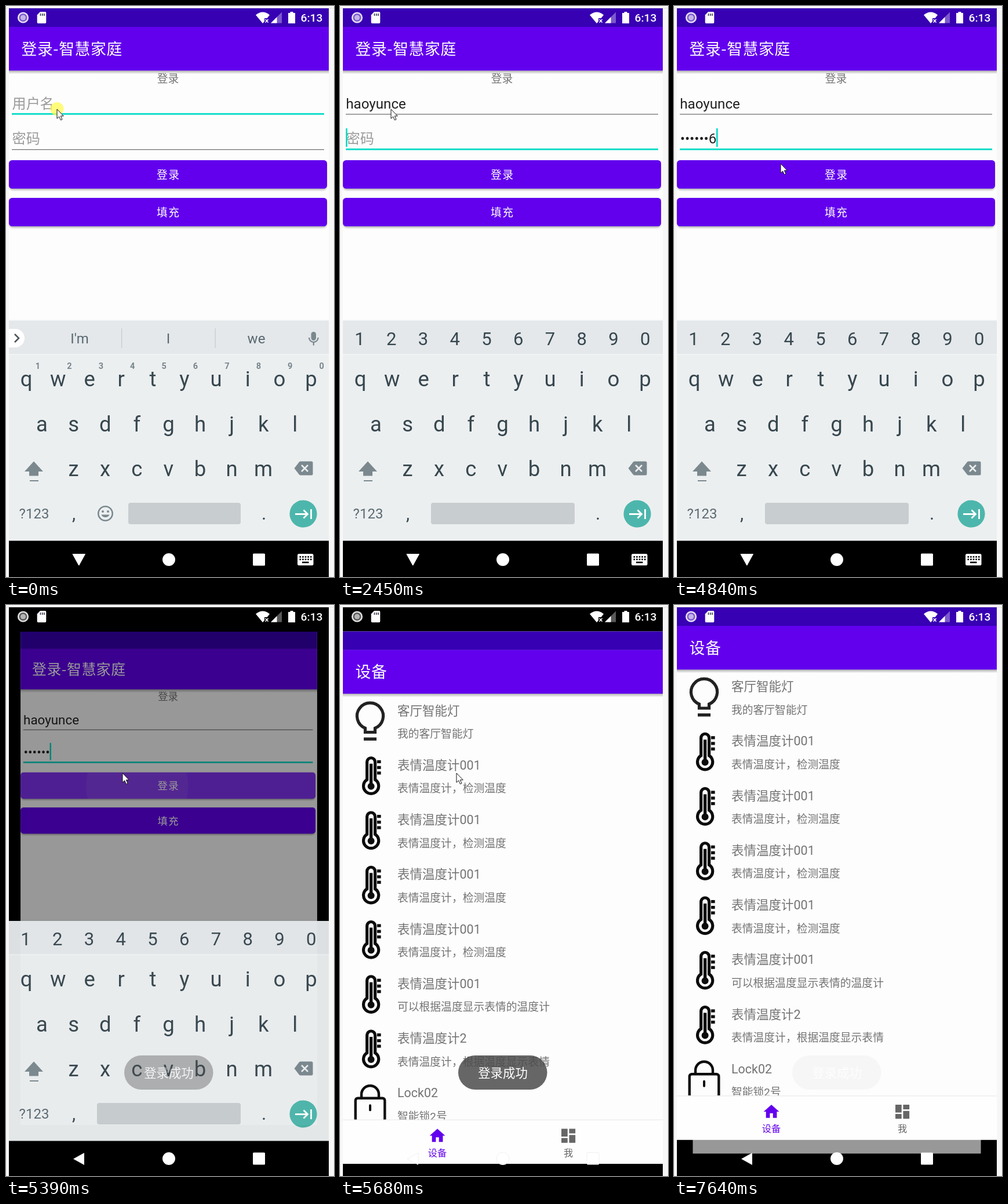
Animation of 566 by 985 pixels, one loop 8.42 s. Source, as an HTML page:

```html
<!DOCTYPE html>
<html lang="zh-CN">
<head>
<meta charset="utf-8">
<title>登录</title>
<style>
  html, body { margin: 0; width: 100%; height: 100%; overflow: hidden; background: #f7f7f7; }
  svg { display: block; width: 100%; height: 100%; }
  text { font-family: Roboto, "Noto Sans CJK SC", "Noto Sans CJK", sans-serif; white-space: pre; }
  .title { font-family: "Noto Sans CJK SC", "Noto Sans CJK", sans-serif; }
</style>
</head>
<body>
<svg id="stage" viewBox="0 0 566 985" xmlns="http://www.w3.org/2000/svg"></svg>
<script>
const LOOP = 8420;
const TEAL = '#03dac5', PURPLE = '#6200ee', KEY = '#37474f', GREY = '#7b898f';
const USER = 'haoyunce', PASS = '1234566';

// ---- markup helpers ----
const rect = (x, y, w, h, fill, more = '') =>
  `<rect x="${x}" y="${y}" width="${w}" height="${h}" fill="${fill}" ${more}/>`;
const text = (x, y, size, fill, str, more = '') =>
  `<text x="${x}" y="${y}" font-size="${size}" fill="${fill}" ${more}>${str}</text>`;
const mid = (x, y, size, fill, str, more = '') =>
  text(x, y, size, fill, str, 'text-anchor="middle" ' + more);
const path = (d, fill, more = '') => `<path d="${d}" fill="${fill}" ${more}/>`;
const line = (d, color, width, more = '') =>
  path(d, 'none', `stroke="${color}" stroke-width="${width}" ${more}`);
const circle = (x, y, r, fill, more = '') =>
  `<circle cx="${x}" cy="${y}" r="${r}" fill="${fill}" ${more}/>`;
const group = (id, body, more = '') => `<g id="${id}" ${more}>${body}</g>`;

function header(title) {
  return rect(5, 4, 552, 32.3, '#3700b3') + rect(5, 36, 552, 75.5, PURPLE) +
    rect(5, 111.5, 552, 6, 'url(#shade)') +
    text(26.5, 83.5, 26.8, '#fff', title, 'class="title" letter-spacing=".6"');
}

function button(y, label, extra = '') {
  return rect(5.5, y + 2, 548, 49.5, '#000', 'rx="6" opacity=".28" filter="url(#soft)"') +
    rect(5, y, 549, 49, PURPLE, 'rx="5.5"') + extra +
    mid(280.3, y + 31.7, 18.8, '#fff', label, 'letter-spacing="1.6"');
}

function loginPage() {
  const press = group('press', rect(5, 266, 549, 49, '#fff', 'rx="5.5" opacity=".2"') +
    circle(222, 291, 95, '#fff', 'id="ripple" opacity=".07" clip-path="url(#btn)"'));
  return rect(5, 4, 552, 918, '#fdfdfd') + header('登录-智慧家庭') +
    mid(279.5, 131.5, 18.8, '#757575', '登录') +
    text(10.5, 176.5, 24.15, '#9b9b9b', '用户名', 'id="userHint"') +
    text(10.3, 176.5, 24.15, '#212121', '', 'id="user"') +
    rect(10, 186, 539, 1.3, '#757575', 'id="userLine"') +
    text(10.5, 236.5, 24.15, '#9b9b9b', '密码', 'id="passHint"') +
    text(10.8, 236.5, 24.15, '#212121', '', 'id="pass"') +
    rect(10, 247, 539, 1.3, '#757575', 'id="passLine"') +
    rect(10, 151, 2.6, 32, TEAL, 'id="caret"') +
    button(266, '登录', press) + button(331, '填充') +
    rect(5, 4, 552, 918, '#000', 'id="dim" opacity="0"');
}

function keyboard() {
  const row = (letters, x, y) => [...letters].map((c, i) =>
    mid(x + 54.6 * i, y, 36.5, KEY, c)).join('');
  const digits = [...'1234567890'];
  const words = rect(199, 556, 1.2, 34, '#c3c9cc') + rect(360.5, 556, 1.2, 34, '#c3c9cc') +
    [127, 280, 432].map((x, i) => mid(x, 582, 24, '#59686f', '', `id="word${i}"`)).join('') +
    path('M5 557H16A16 16 0 0 1 16 589H5Z', '#fff') +
    line('M15 566L22 573L15 580', '#4d565a', 2.6) +
    rect(526.5, 562, 8.5, 15, GREY, 'rx="4.2"') +
    line('M523 572a7.8 7.8 0 0 0 15.6 0M530.8 580v5.5', GREY, 2.3) +
    digits.map((d, i) => mid(55 + 54.4 * i, 626, 14.5, '#78858b', d, 'font-weight="700"')).join('') +
    circle(171.5, 875.5, 12.2, 'none', `stroke="${GREY}" stroke-width="2.6"`) +
    circle(167, 872, 2, GREY) + circle(176, 872, 2, GREY) +
    path('M164.5 877.5h14a7.4 6.6 0 0 1-14 0Z', GREY);
  const numbers = digits.map((d, i) => mid(34 + 54.75 * i, 585, 31, KEY, d)).join('');
  return rect(5, 541.5, 552, 2, '#000', 'opacity=".04"') +
    rect(5, 543, 552, 58, '#e4e8eb') + rect(5, 601, 552, 321.5, '#eceff0') +
    rect(5, 600.5, 552, 1.5, '#f5f7f8') +
    group('words', words) + group('numbers', numbers) +
    row('qwertyuiop', 35, 656) + row('asdfghjkl', 62, 734) + row('zxcvbnm', 116.5, 811) +
    path('M48 785.5L64 803H56V810.5H40V803H32Z', GREY) + rect(41, 818, 15, 2, GREY) +
    path('M497.5 797.5L506 786.5Q507 785.5 508.5 785.5H527Q529.5 785.5 529.5 788V807Q529.5 809.5 527 809.5H508.5Q507 809.5 506 808.5Z', GREY) +
    line('M510 792l11 11M521 792l-11 11', '#eceff0', 2.6) +
    mid(48.5, 884, 24, '#5c6b72', '?123') +
    mid(117, 886, 31, KEY, ',') + mid(445, 886, 31, KEY, '.') +
    rect(211, 857, 194, 37, '#c8cdcf', 'id="space" rx="4"') +
    circle(513, 876, 23.6, '#4db6ac') +
    line('M499 876.5h21M513.5 869.5l7 7-7 7M526.5 868v17', '#fff', 2.8);
}

const bulb = y => `<g transform="translate(0 ${y})">` +
  line('M43.5 53V46A22.6 22.6 0 1 1 60.5 46V53Z', '#222', 5.2) +
  rect(41, 62, 22, 5.4, '#222') + '</g>';
const thermometer = y => `<g transform="translate(0 ${y})">` +
  line('M46.6 10a7 7 0 0 1 14 0V40.5A13.1 13.1 0 1 1 46.6 40.5Z', '#0c0c0c', 5.2) +
  line('M53.6 13V50', '#0c0c0c', 5.4) + circle(53.6, 52, 6, '#0c0c0c') +
  [7, 17, 26.5].map(t => rect(64, t, 6.6, 5.2, '#0c0c0c')).join('') + '</g>';
const lock = y => `<g transform="translate(0 ${y})">` +
  line('M37 25V18a15 15 0 0 1 30 0V25', '#0c0c0c', 4.4) +
  rect(26.7, 24.5, 50.6, 40, 'none', 'rx="4" stroke="#0c0c0c" stroke-width="4.4"') +
  line('M52 37V45', '#0c0c0c', 4, 'stroke-linecap="round"') + '</g>';

function devicePage() {
  const meter = '表情温度计';
  const rows = [['客厅智能灯', '我的客厅智能灯', bulb]];
  for (let i = 0; i < 4; i++) rows.push([meter + '001', meter + '，检测温度', thermometer]);
  rows.push([meter + '001', '可以根据温度显示表情的温度计', thermometer],
    [meter + '2', meter + '，根据温度显示表情', thermometer],
    ['Lock02', '智能锁2号', lock]);
  const list = rows.map(([name, note, icon], i) => {
    const y = 94.25 * i;
    return icon(y + 125) + text(99, y + 148, 21.5, '#737373', name) +
      text(99, y + 187.5, 18.8, '#737373', note);
  }).join('');
  const tab = (x, d, label, color) =>
    path(d, color, `transform="translate(${x - 16} 858) scale(1.34)"`) +
    mid(x, 909, 16.2, color, label);
  return rect(5, 4, 552, 918.5, '#fdfdfd') + header('设备') + list +
    rect(5, 847, 552, 75.5, '#fefefe') + rect(5, 846, 552, 1.5, '#eee') +
    tab(168, 'M10 20v-6h4v6h5v-8h3L12 3 2 12h3v8z', '设备', PURPLE) +
    tab(394, 'M3 13h8V3H3zM3 21h8v-6H3zM13 21h8V11h-8zM13 3v6h8V3z', '我', '#666');
}

function statusIcons() {
  return circle(29.5, 20, 8.3, '#fff', 'fill-opacity=".35" stroke="#fff" stroke-opacity=".85" stroke-width="2.6"') +
    circle(29.5, 20, 4.6, '#fff', 'opacity=".55"') +
    path('M59 10H67.5Q69.3 10 69.3 12V28Q69.3 30 67.5 30H55.5Q53.7 30 53.7 28V15.5Z', '#fff') +
    line('M59.5 13v4M62.8 13v4M66 13v4', '#3a3a50', 1.6) +
    path('M431 15.5Q443 5.5 455 15.5L450.5 21H446V26.5L443 30Z', '#fff') +
    line('M447.5 23l5 5.5M452.5 23l-5 5.5', '#fff', 1.6) +
    path('M457 29.5L476 10.5V29.5Z', '#fff', 'opacity=".35"') +
    path('M457 29.5L467.5 19V29.5Z', '#fff') +
    path('M490.5 10H495.500V12H499V30H487V12H490.5Z', '#fff') +
    text(508.5, 27.3, 19.2, '#fff', '6:13', 'font-weight="500"');
}

function navIcons() {
  const edge = 'stroke="#000" stroke-opacity=".06" stroke-width="1"';
  const keys = [0, 1].map(r => [0, 1, 2, 3, 4].map(c =>
    rect(506.5 + c * 4.6, 949 + r * 4.4, 2.6, 2.6, '#000')).join('')).join('');
  return path('M115 945.5H136.500L125.8 965Z', '#fff', `id="down" stroke="#fff" stroke-linejoin="round"`) +
    path('M135 945V966L116 955.500Z', '#fff', `id="back" stroke-linejoin="round" ${edge}`) +
    circle(281, 955, 11, '#fff', edge) + rect(426, 944.5, 21, 21, '#fff', 'rx="1.5" ' + edge) +
    group('ime', rect(503, 945, 27.5, 20, '#fff', 'rx="2.500"') + keys +
      rect(511, 958.5, 11.5, 2.6, '#000'));
}

const stage = document.getElementById('stage');
stage.innerHTML = `<defs>
  <linearGradient id="shade" x1="0" y1="0" x2="0" y2="1">
    <stop offset="0" stop-color="#000" stop-opacity=".3"/><stop offset="1" stop-color="#000" stop-opacity="0"/>
  </linearGradient>
  <filter id="soft" x="-5%" y="-30%" width="110%" height="160%"><feGaussianBlur stdDeviation="1.4"/></filter>
  <clipPath id="btn">${rect(5, 266, 549, 49, '#000', 'rx="5.5"')}</clipPath>
  </defs>` +
  rect(0, 0, 566, 985, '#f7f7f7') + rect(5, 4, 552, 981, '#000') +
  group('login', loginPage()) + group('board', keyboard()) + group('page', devicePage()) +
  statusIcons() + navIcons() +
  group('toast', rect(204, 777, 153.5, 59, '#4c4c4c', 'rx="29.500" opacity=".85"') +
    mid(281, 814.5, 21.4, '#fff', '登录成功')) +
  circle(88, 177.5, 11.5, '#fff94f', 'id="tap"') +
  path('M0 0V16.2L3.7 12.8L6.4 18.8L9 17.700L6.400 11.800H11.300Z', '#fff',
    'id="mouse" stroke="#111" stroke-width="1"') +
  rect(0, 0, 566, 3, '#fbfbfb') + rect(0, 3, 566, 1, '#e0e0e0');

const el = {};
stage.querySelectorAll('[id]').forEach(n => el[n.id] = n);
const set = (id, attrs) => { for (const k in attrs) el[id].setAttribute(k, attrs[k]); };
const show = (id, on) => set(id, { visibility: on ? 'visible' : 'hidden' });
const write = (id, str) => { if (el[id].textContent !== str) el[id].textContent = str; };

// ---- timing ----
const spread = (a, b, n) =>
  Array.from({ length: n }, (_, i) => Math.floor((a + (b - a) * i / (n - 1)) / 10) * 10);
const ticks = [0, 80, 150, ...spread(4380, 5160, 11), ...spread(5240, 5830, 9),
  ...spread(6000, 6780, 11), 6860, ...spread(7410, 7640, 4)];
const lastOf = (list, t) => list.filter(x => x <= t).pop();

// keys: [time, value, value, ...]
function track(keys, t) {
  const i = keys.findIndex(k => k[0] > t);
  if (i < 0) return keys[keys.length - 1].slice(1);
  if (i === 0) return keys[0].slice(1);
  const [a, b] = [keys[i - 1], keys[i]], p = (t - a[0]) / (b[0] - a[0]);
  return a.slice(1).map((v, j) => v + (b[j + 1] - v) * p);
}

const MOUSE = [[4380, 88, 178], [4840, 184, 272], [5160, 186, 283], [5310, 201, 290],
  [5920, 201, 290], [6780, 354, 937], [6860, 360, 946], [7400, 360, 946], [7410, 360, 966], [7480, 360, 990]];
const LOGIN = [[5240, 1, 4, 0], [5310, .97, 20, .2], [5380, .927, 46, .4], [5460, .912, 70, .4],
  [5530, .902, 96, .4], [5830, .9, 120, .4]];
const PAGE = [[5460, 800, .35], [5530, 571, .765], [5600, 200, .95], [5680, 41.5, 1], [5750, 12, 1], [5830, 0, 1]];
const BOARD = [[5310, 0, 1], [5380, 2, .97], [5460, 60, .4], [5530, 140, 0]];
const TOAST = [[5310, 0], [5380, .45], [5530, .81], [5680, 1], [7400, 1], [7410, .8], [7640, .04]];
const TYPED = [[0, 0], [1030, 1], [1190, 2], [1270, 3], [1440, 5], [1690, 6], [1820, 7], [1990, 8]];
const SECRET = [3080, 3310, 3540, 3850, 4150, 4380, 4610];
const WORDS = [["I'm", 'I', 'we'], ['h', 'he', 'have'], ['ha', 'have', 'happy'], ['hao', 'has', 'harbor'],
  [], ['haoyu', 'hairy', 'hallway'], ['haoyun', 'haven', 'haunted'],
  ['haoyunc', 'haunch', 'launched'], ['haoyunce', 'haunches', 'launches']];

function fields(t) {
  const n = TYPED.filter(k => k[0] <= t).pop()[1];
  const m = SECRET.filter(x => x <= t).length;
  const second = t >= 2370, numeric = t >= 2450;
  write('user', USER.slice(0, n));
  show('userHint', n === 0);
  const secret = t >= 5080 ? '•'.repeat(6) : m ? '•'.repeat(m - 1) + PASS[m - 1] : '';
  write('pass', secret);
  show('passHint', !secret);
  const mark = (id, on, y) => set(id, { y: on ? y - 1.2 : y, height: on ? 2.8 : 1.3, fill: on ? TEAL : '#757575' });
  mark('userLine', !second, 186);
  mark('passLine', second, 247);
  const field = el[second ? 'pass' : 'user'];
  const width = field.textContent ? field.getComputedTextLength() + .5 : 0;
  set('caret', { x: 10 + width, y: second ? 211 : 151 });
  show('caret', t >= 550 && !(t >= 2930 && t < 3080));
  WORDS[n].forEach((w, i) => write('word' + i, w));
  show('words', !numeric);
  show('numbers', numeric);
  set('space', numeric ? { x: 157, width: 248 } : { x: 211, width: 194 });
}

function draw(time) {
  const t = time % LOOP, s = lastOf(ticks, t);
  fields(t);

  const [scale, top, dim] = track(LOGIN, s);
  set('login', { transform: `translate(${281 * (1 - scale)} ${top - 4 * scale}) scale(${scale})` });
  set('dim', { opacity: dim });
  show('press', s >= 5240);
  set('ripple', { r: track([[5240, 30], [5380, 95]], s)[0] });

  const [drop, solid] = track(BOARD, s);
  set('board', { transform: `translate(0 ${drop})`, opacity: solid });

  const [shift, alpha] = track(PAGE, s);
  set('page', { transform: `translate(0 ${shift})`, opacity: s >= 5460 ? alpha : 0 });
  const closed = s >= 5310;
  show('down', !closed);
  show('ime', !closed);
  show('back', closed);
  set('toast', { opacity: track(TOAST, s)[0] });

  set('tap', { opacity: s < 80 ? .75 : s < 150 ? .4 : 0 });
  const [mx, my] = track(MOUSE, s);
  set('mouse', { transform: `translate(${mx} ${my})` });
}

const start = performance.now();
function tick() {
  draw(performance.now() - start);
  requestAnimationFrame(tick);
}
tick();
</script>
</body>
</html>
```
